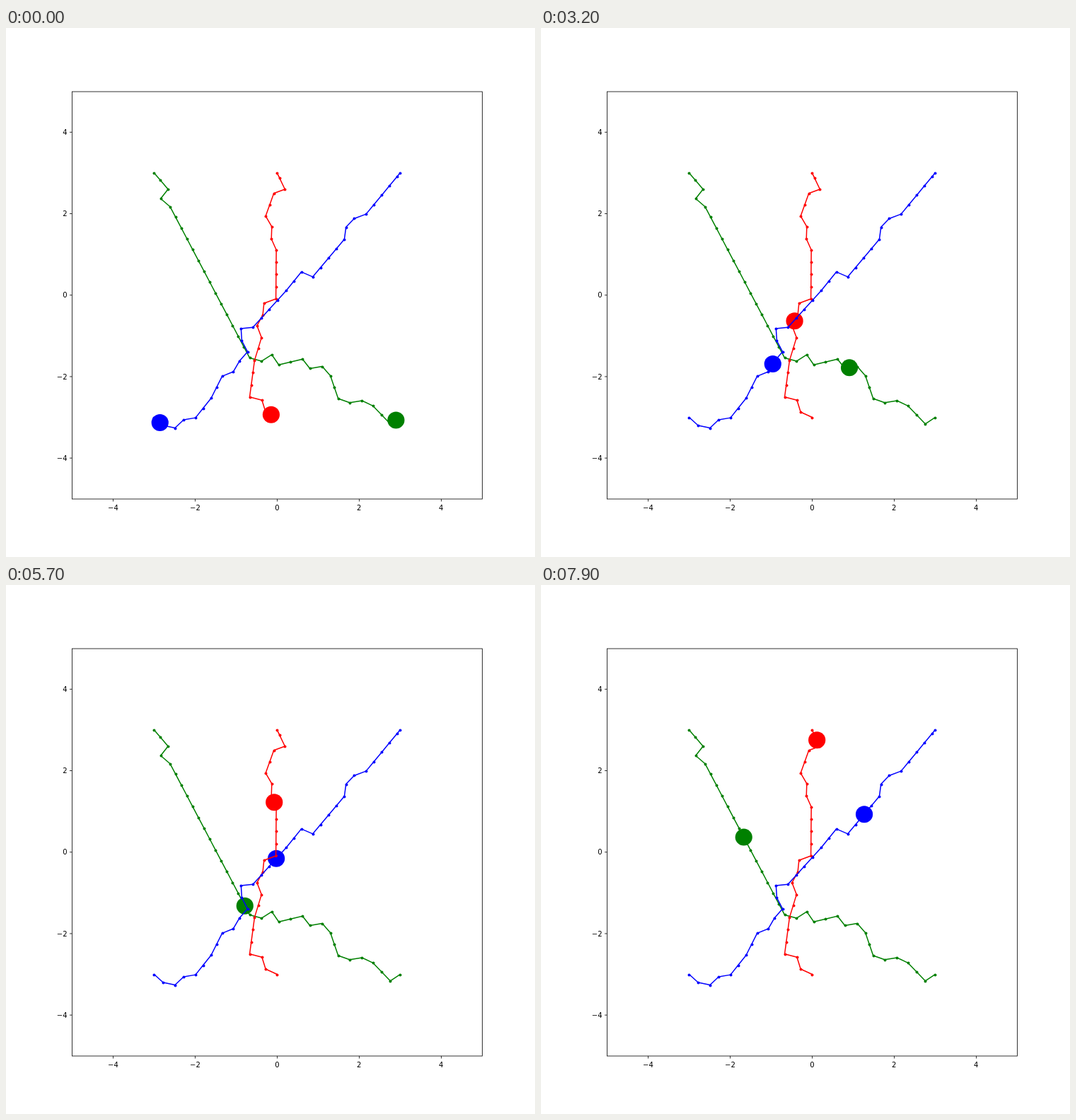
An HTML page for the animation above (8 s loop, 748 px wide and 748 px high).

```html
<!DOCTYPE html>
<html lang="en">
<head>
<meta charset="utf-8">
<title>Three discs on planned paths</title>
<style>
  html, body { margin: 0; width: 100%; height: 100%; overflow: hidden; background: #fff; }
  svg { display: block; width: 100vw; height: 100vh; }
  text { font: 10px "DejaVu Sans", sans-serif; }
</style>
</head>
<body>
<svg id="stage" viewBox="0 0 748 748"></svg>
<script>
const FRAME_MS = 100, FRAMES = 80;
const STRIDE = 0.3; // distance between waypoints, in plot units
const AXES = { left: 93.5, right: 673.5, top: 90, bottom: 666 };
const toX = v => 383.35 + 57.97 * v;
const toY = v => 377.74 - 57.6 * v;
const snap = v => Math.round(v) + .5;
const lerp = (a, b, f) => a + (b - a) * f;

// corners: where a path turns. start, pace: waypoints passed at first and per frame.
const agents = [
  {
    color: "#008000", start: .42, pace: .288,
    corners: `3,-3 2.76,-3.16 2.34,-2.72 2.07,-2.59 1.77,-2.64 1.49,-2.54 1.3,-1.98
      1.1,-1.75 .8,-1.8 .62,-1.57 .04,-1.71 -.13,-1.46 -.38,-1.62 -.67,-1.54
      -2.61,2.17 -2.84,2.37 -2.66,2.6 -3,3`
  },
  {
    color: "#ff0000", start: .52, pace: .279,
    corners: `0,-3 -.28,-2.87 -.37,-2.58 -.67,-2.5 -.55,-1.6 -.38,-1.04 -.49,-.75
      -.35,-.49 -.32,-.2 -.03,-.09 -.02,1.11 -.14,1.38 -.13,1.68 -.28,1.94
      -.08,2.5 .19,2.6 0,3`
  },
  {
    color: "#0000ff", start: .65, pace: .284,
    corners: `-3,-3 -2.78,-3.2 -2.49,-3.26 -2.28,-3.06 -1.99,-3.01 -1.61,-2.53
      -1.34,-1.99 -1.07,-1.88 -.92,-1.62 -.72,-1.39 -.86,-1.12 -.88,-.82 -.59,-.79
      .22,.11 .59,.57 .87,.45 1.64,1.37 1.68,1.67 1.88,1.88 2.17,1.99 3,3`
  }
];

// Walks from corner to corner in equal strides; the last stride may be shorter.
function walk(corners) {
  const points = corners.trim().split(/\s+/).map(pair => pair.split(",").map(Number));
  const path = [points[0]];
  for (let i = 1; i < points.length; i++) {
    const [x0, y0] = points[i - 1], [x1, y1] = points[i];
    const strides = Math.hypot(x1 - x0, y1 - y0) / STRIDE;
    for (let k = 1; k < strides - .2; k++)
      path.push([lerp(x0, x1, k / strides), lerp(y0, y1, k / strides)]);
    path.push(points[i]);
  }
  return dropCrowded(path).map(([x, y]) => [toX(x), toY(y)]);
}

// Removes a stride that ends almost on the next corner.
function dropCrowded(path) {
  return path.filter(([x, y], i) => {
    const next = path[i + 1];
    return !next || Math.hypot(next[0] - x, next[1] - y) > STRIDE / 5;
  });
}

const stage = document.getElementById("stage");
function add(tag, attrs) {
  const node = document.createElementNS("http://www.w3.org/2000/svg", tag);
  for (const name in attrs) node.setAttribute(name, attrs[name]);
  return stage.appendChild(node);
}

function drawAxes() {
  const pen = { stroke: "#000", "stroke-width": .8, fill: "none" };
  const { left, right, top, bottom } = AXES;
  add("rect", { x: left, y: top, width: right - left, height: bottom - top, ...pen });
  for (let v = -4; v <= 4; v += 2) {
    add("path", { d: `M${snap(toX(v))} ${bottom}v3.5M${left} ${toY(v)}h-3.5`, ...pen });
    const label = String(v).replace("-", "\u2212");
    add("text", { x: toX(v), y: 681.5, "text-anchor": "middle" }).textContent = label;
    add("text", { x: 86.5, y: toY(v) + 3.7, "text-anchor": "end" }).textContent = label;
  }
}

// Discs lie under every path.
for (const agent of agents) {
  agent.path = walk(agent.corners);
  agent.disc = add("ellipse", { rx: 12.1, ry: 12, fill: agent.color });
}
for (const { path, color } of agents) {
  add("polyline", { points: path.join(" "), fill: "none", stroke: color,
    "stroke-width": 1.5, "stroke-linejoin": "round" });
  for (const [x, y] of path)
    add("circle", { cx: snap(x), cy: snap(y), r: 2, fill: color });
}
drawAxes();

function render(ms) {
  const frame = Math.floor(ms / FRAME_MS) % FRAMES;
  for (const { path, disc, start, pace } of agents) {
    const progress = start + pace * frame;
    const i = Math.floor(progress), f = progress - i;
    disc.setAttribute("cx", lerp(path[i][0], path[i + 1][0], f));
    disc.setAttribute("cy", lerp(path[i][1], path[i + 1][1], f));
  }
}

const began = performance.now();
function tick() {
  render(performance.now() - began);
  requestAnimationFrame(tick);
}
tick();
</script>
</body>
</html>
```
